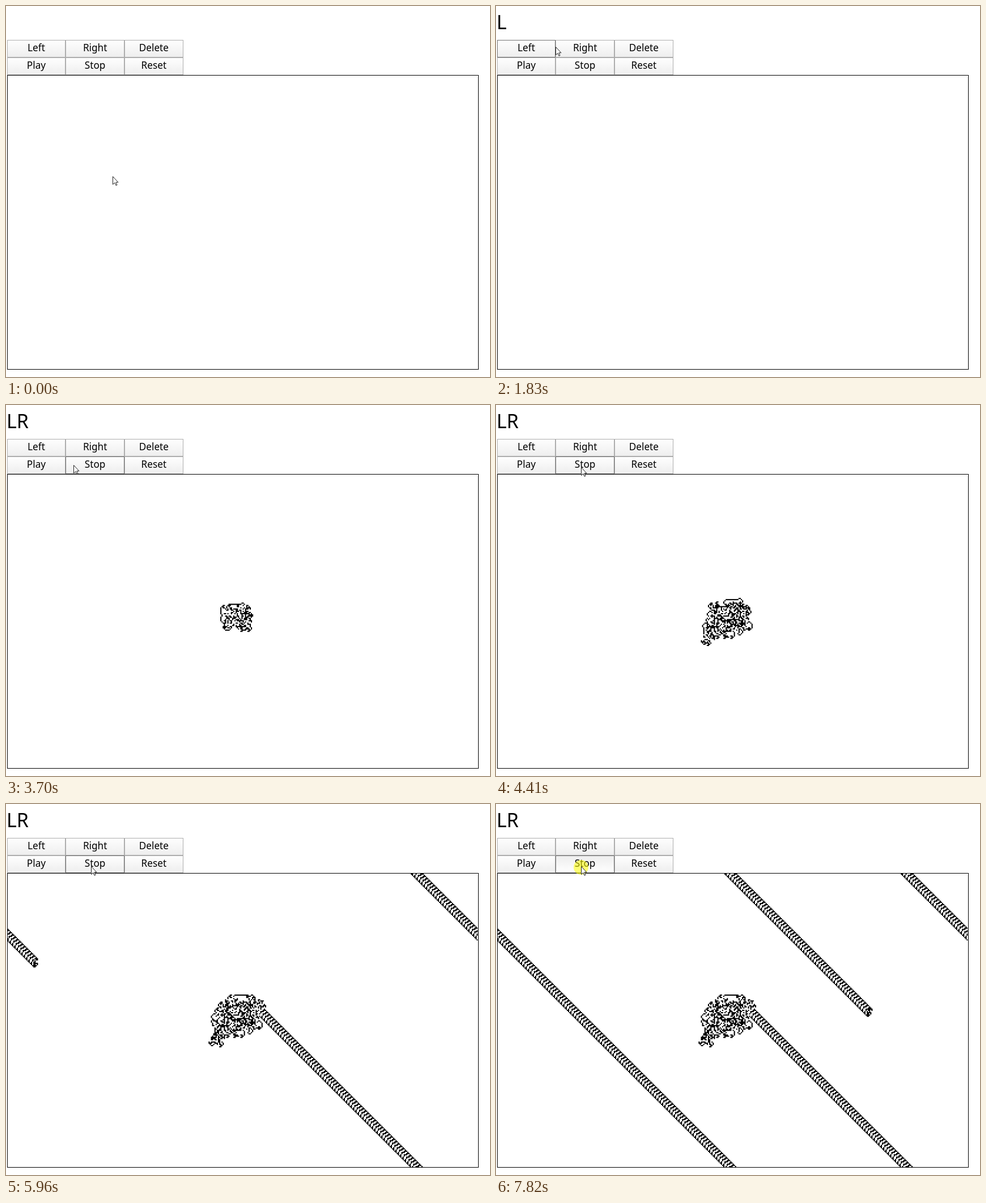
Animation, 854 px wide and 656 px high, one loop 7.99 s. Source, as an HTML page with a canvas:

```html
<!DOCTYPE html>
<html lang="en">
<head>
<meta charset="utf-8">
<title>Langton's ant</title>
<style>
  html, body { margin: 0; width: 100%; height: 100%; overflow: hidden; background: #fff; }
  body { position: relative; color: #000; font-family: "Noto Sans", "Open Sans", sans-serif; }
  body > * { position: absolute; box-sizing: border-box; }
  #rule { left: 1px; top: 5px; font-size: 34px; line-height: 46px; }
  .button {
    width: 103.7px; height: 31px; border: 1px solid #adadad;
    background: linear-gradient(#fefefe, #eee);
    font-size: 17.2px; line-height: 25px; text-align: center;
  }
  .hover { border-color: #707070; z-index: 1; }
  .pressed { background: linear-gradient(#eee, #fefefe); }
  #frame { left: 2px; top: 122px; width: 832px; height: 520.75px; border: 1px solid #000; }
  #field { display: block; width: 830px; height: 518.75px; transform: translateX(-.5px); }
  #pointer { left: 0; top: 0; width: 40px; height: 40px; z-index: 2; overflow: visible; }
</style>
</head>
<body>
<div id="rule"></div>
<div id="frame"><canvas id="field" width="800" height="500"></canvas></div>
<svg id="pointer">
  <circle id="glow" cx="0" cy="2" r="13" fill="#ff0" fill-opacity=".55"/>
  <path d="M.5 .5V14.5L3.8 11.5 6 16.3 8 15.4 5.9 10.8H10Z" fill="#fff" stroke="#222"/>
</svg>
<script>
const LOOP = 7990, COLS = 400, ROWS = 250, CELL = 2;
const PLAY_TIME = 3300, TICK = 99.4, STEPS_PER_TICK = 800;
const BUTTON_LEFT = 1.6, BUTTON_TOP = 60, BUTTON_WIDTH = 103.7, BUTTON_HEIGHT = 31;

const pointerStart = [188, 301];
const pointerMoves = [
  { from: 590, to: 830, x: 92, y: 50 },
  { from: 1050, to: 1290, x: 84, y: 70 },
  { from: 1740, to: 2000, x: 120, y: 73 },
  { from: 2340, to: 2760, x: 86, y: 101 },
  { from: 3600, to: 3930, x: 150, y: 110 }];

const presses = [
  { from: 1610, to: 1690, adds: "L" },
  { from: 2230, to: 2310, adds: "R" },
  { from: 3100, to: 3240, adds: "" },
  { from: 7820, to: LOOP, adds: "" }];

const $ = id => document.getElementById(id);
const ctx = $("field").getContext("2d");

const buttons = ["Left", "Right", "Delete", "Play", "Stop", "Reset"].map((label, i) => {
  const el = document.createElement("div");
  el.textContent = label;
  el.style.left = BUTTON_LEFT + BUTTON_WIDTH * (i % 3) + "px";
  el.style.top = BUTTON_TOP + BUTTON_HEIGHT * Math.floor(i / 3) + "px";
  document.body.append(el);
  return el;
});

// Cells the ant flips, in order, turned so that its highway runs down and right.
function walk(steps) {
  const black = new Set(), path = [];
  let x = 0, y = 0, dx = 0, dy = -1;
  for (let i = 0; i < steps; i++) {
    const key = x * 4096 + y;
    path.push([x, y]);
    if (black.delete(key)) [dx, dy] = [-dy, dx];
    else { black.add(key); [dx, dy] = [dy, -dx]; }
    x += dx;
    y += dy;
  }
  const sx = Math.sign(x), sy = Math.sign(y);
  let minX = 0, minY = 0;
  for (const p of path) {
    p[0] *= sx;
    p[1] *= sy;
    minX = Math.min(minX, p[0]);
    minY = Math.min(minY, p[1]);
  }
  // The chaotic part spreads further to the left than to the top.
  return minY < minX ? path.map(([a, b]) => [b, a]) : path;
}

const ticksAt = t => Math.max(0, Math.floor((t - PLAY_TIME) / TICK));
const path = walk(ticksAt(LOOP) * STEPS_PER_TICK);

function drawField(steps) {
  const cells = new Uint8Array(COLS * ROWS);
  for (const [x, y] of path.slice(0, steps)) {
    const col = (x + COLS * 2.5) % COLS, row = (y + ROWS * 2.5) % ROWS;
    cells[row * COLS + col] ^= 1;
  }
  ctx.clearRect(0, 0, COLS * CELL, ROWS * CELL);
  cells.forEach((on, i) => {
    if (on) ctx.fillRect(i % COLS * CELL, Math.floor(i / COLS) * CELL, CELL, CELL);
  });
}

// Each move slows down towards its end.
function pointerAt(t) {
  let [x, y] = pointerStart;
  for (const move of pointerMoves) {
    const p = Math.min(1, Math.max(0, (t - move.from) / (move.to - move.from)));
    const eased = p * (2 - p);
    x += (move.x - x) * eased;
    y += (move.y - y) * eased;
  }
  return [Math.round(x), Math.round(y)];
}

let shownTicks = -1;

function render() {
  const t = performance.now() % LOOP;

  const ticks = ticksAt(t);
  if (ticks !== shownTicks) drawField(ticks * STEPS_PER_TICK);
  shownTicks = ticks;

  const [x, y] = pointerAt(t);
  const down = presses.some(({ from, to }) => t >= from && t < to);
  $("pointer").style.transform = `translate(${x}px, ${y}px)`;
  $("glow").style.display = down ? "" : "none";

  const col = Math.floor((x - BUTTON_LEFT) / BUTTON_WIDTH);
  const row = Math.floor((y - BUTTON_TOP) / BUTTON_HEIGHT);
  const over = row === 0 || row === 1 ? row * 3 + col : -1;
  buttons.forEach((el, i) => {
    el.className = "button" + (i === over ? " hover" + (down ? " pressed" : "") : "");
  });
  $("rule").textContent = presses.filter(press => press.to <= t).map(press => press.adds).join("");

  requestAnimationFrame(render);
}
render();
</script>
</body>
</html>
```
